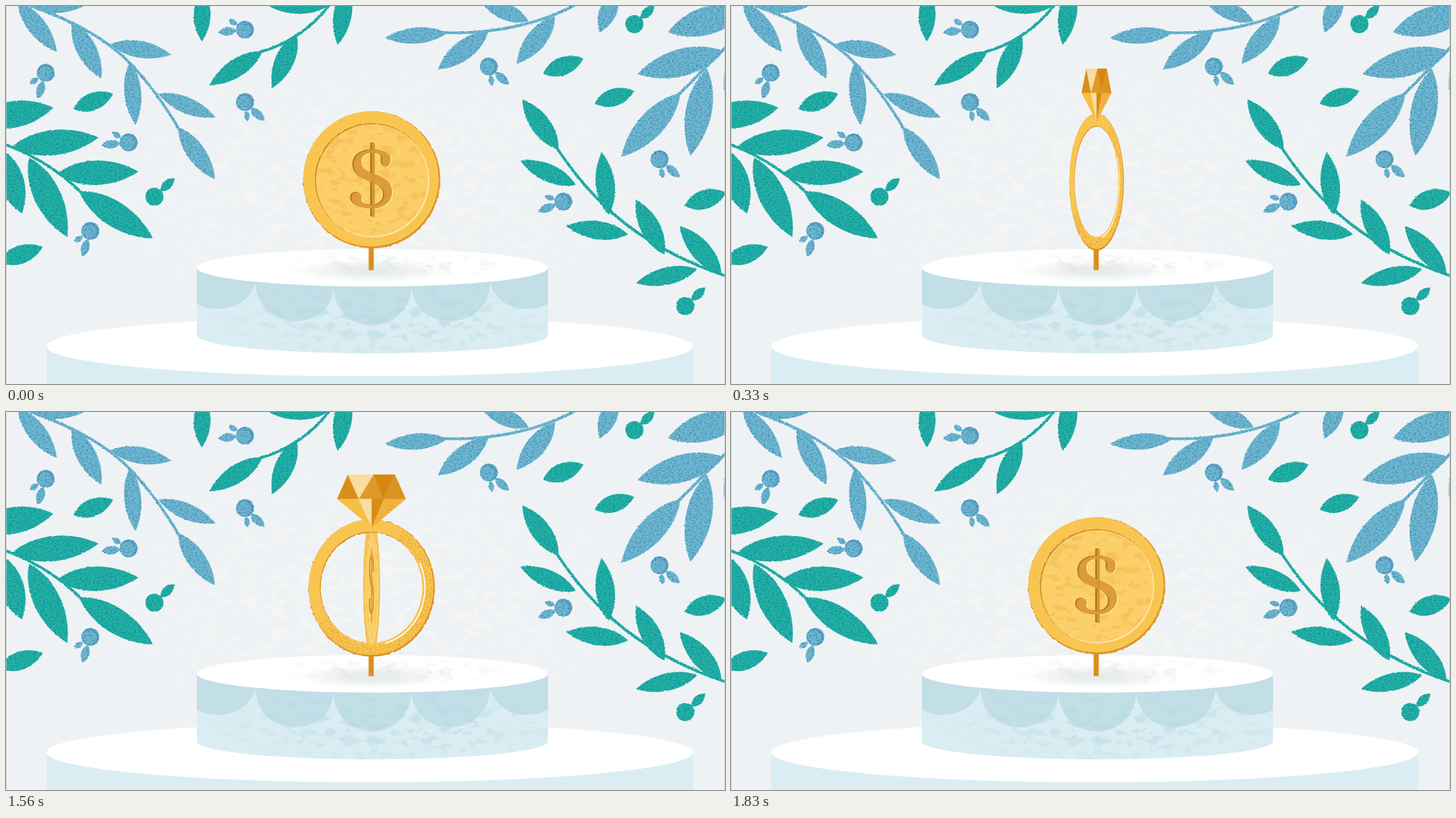
Write an HTML page that moves like this. It is 1032 by 543 pixels and loops after 2.86 s.

```html
<!DOCTYPE html>
<html lang="en">
<head>
<meta charset="utf-8">
<title>Coin and ring</title>
<style>
  html, body { margin: 0; width: 100%; height: 100%; overflow: hidden; background: #eff2f4; }
  svg { display: block; width: 100%; height: 100%; }
</style>
</head>
<body>
<svg viewBox="0 0 1032 543" preserveAspectRatio="none">
  <defs>
    <!-- ragged edge with a linen grain -->
    <filter id="leafy" x="-10%" y="-10%" width="120%" height="120%" color-interpolation-filters="sRGB">
      <feTurbulence type="fractalNoise" baseFrequency=".32 .5" numOctaves="2" seed="4" result="n"/>
      <feDisplacementMap in="SourceGraphic" in2="n" scale="2.6" xChannelSelector="R" yChannelSelector="G" result="s"/>
      <feColorMatrix in="n" values="0 0 0 0 0  0 0 0 0 .36  0 0 0 0 .46  1.1 0 0 0 -.46"/>
      <feComposite in2="s" operator="in" result="g"/>
      <feMerge><feMergeNode in="s"/><feMergeNode in="g"/></feMerge>
    </filter>
    <filter id="rough" x="-10%" y="-10%" width="120%" height="120%" color-interpolation-filters="sRGB">
      <feTurbulence type="fractalNoise" baseFrequency=".2" numOctaves="2" seed="9"/>
      <feDisplacementMap in="SourceGraphic" scale="3" xChannelSelector="R" yChannelSelector="G"
        in2="SourceGraphic" result="unused"/>
      <feTurbulence type="fractalNoise" baseFrequency=".2" numOctaves="2" seed="9" result="n"/>
      <feDisplacementMap in="SourceGraphic" in2="n" scale="3" xChannelSelector="R" yChannelSelector="G"/>
    </filter>
    <!-- keep only speckles of the shape -->
    <filter id="fine" x="-20%" y="-20%" width="140%" height="140%" color-interpolation-filters="sRGB">
      <feTurbulence type="fractalNoise" baseFrequency=".55" numOctaves="2" seed="2"/>
      <feColorMatrix values="0 0 0 0 0  0 0 0 0 0  0 0 0 0 0  6 0 0 0 -3.1" result="m"/>
      <feComposite in="SourceGraphic" in2="m" operator="in"/>
    </filter>
    <filter id="patch" x="-5%" y="-5%" width="110%" height="110%" color-interpolation-filters="sRGB">
      <feTurbulence type="fractalNoise" baseFrequency=".05 .09" numOctaves="5" seed="7"/>
      <feColorMatrix values="0 0 0 0 0  0 0 0 0 0  0 0 0 0 0  9 0 0 0 -4.8" result="m"/>
      <feComposite in="SourceGraphic" in2="m" operator="in"/>
    </filter>
    <radialGradient id="haze">
      <stop offset=".35" stop-color="#f7f6f4"/>
      <stop offset="1" stop-color="#f7f6f4" stop-opacity="0"/>
    </radialGradient>
    <radialGradient id="shade">
      <stop offset=".3" stop-color="#dfe3e5"/>
      <stop offset="1" stop-color="#dfe3e5" stop-opacity="0"/>
    </radialGradient>
    <radialGradient id="frost">
      <stop offset=".3" stop-color="#b3d9e0"/>
      <stop offset="1" stop-color="#b3d9e0" stop-opacity="0"/>
    </radialGradient>
    <path id="ess" d="M551 214C544 208 535 207 526 207C508 207 499 216 499 228C499 241 509 247 522 252
      C536 257 543 262 543 271C543 281 536 286 526 286C517 286 509 283 510 277C512 271 507 267 502 268
      C497 269 495 273 496 278C498 286 510 291 525 291C543 291 554 281 554 267C554 254 546 248 532 243
      C519 238 510 234 510 224C510 215 517 211 526 211C534 211 540 213 540 219C538 226 542 231 546 231
      C552 230 553 220 551 214Z"/>
    <clipPath id="tier"><path d="M274 376V473A252 26 0 0 0 778 473V376Z"/></clipPath>
  </defs>

  <rect width="1032" height="543" fill="#eff2f4"/>
  <ellipse cx="520" cy="270" rx="430" ry="200" fill="url(#haze)" filter="url(#patch)" opacity=".75"/>
  <g id="plants"></g>

  <g id="cake">
    <path d="M58 489V543H986V489Z" fill="#d9edf2"/>
    <ellipse cx="522" cy="489" rx="464" ry="43" fill="#fff"/>
    <path d="M274 376V473A252 26 0 0 0 778 473V376Z" fill="#d9edf2"/>
    <path d="M274 376V428C295 440 345 440 358 398C362 470 466 470 470 404C474 477 578 477 582 403
      C586 470 691 470 695 398C708 440 755 440 778 428V376Z" fill="#c2dee7"/>
    <g clip-path="url(#tier)">
      <ellipse cx="560" cy="450" rx="270" ry="62" fill="url(#frost)" filter="url(#patch)" opacity=".5"/>
    </g>
    <ellipse cx="526" cy="376" rx="252" ry="27" fill="#fff"/>
    <ellipse cx="526" cy="380" rx="108" ry="17" fill="url(#shade)" opacity=".7"/>
    <ellipse cx="560" cy="372" rx="190" ry="21" fill="url(#shade)" filter="url(#patch)" opacity=".5"/>
  </g>

  <rect x="520.5" y="340" width="7.3" height="39.5" fill="#d9901c"/>

  <g id="coin">
    <circle cx="525" cy="249.7" r="98.4" fill="#dc9526" filter="url(#rough)"/>
    <circle cx="523.9" cy="248.3" r="97" fill="#f9c551"/>
    <circle cx="525" cy="249.7" r="81.5" fill="#c88a25" filter="url(#rough)"/>
    <circle cx="526.4" cy="251.1" r="81" fill="#fef0c4"/>
    <circle cx="525.6" cy="250.3" r="80.5" fill="#fbcf69"/>
    <circle cx="525.6" cy="250.3" r="79.5" fill="#f0b94b" filter="url(#patch)" opacity=".5"/>
    <g fill="#fce3a3" transform="translate(1.6 1)"><use href="#ess"/></g>
    <g fill="#a8741f">
      <use href="#ess" x="-1.8" y="-.8"/>
      <rect x="522.8" y="196" width="5" height="106"/>
    </g>
    <use href="#ess" fill="#dc9c37"/>
    <rect x="525" y="197" width="4.3" height="106" fill="#d7952c"/>
  </g>

  <g id="ring" fill="none">
    <g filter="url(#rough)">
      <circle cx="525" cy="252.8" r="89" stroke="#d9911f" stroke-width="19"/>
    </g>
    <circle cx="524" cy="251.8" r="88.6" stroke="#f9c551" stroke-width="17.4"/>
    <path d="M569.5 175.7A89 89 0 1 1 448 297.3" stroke="#dc9526" stroke-width="15" filter="url(#fine)" opacity=".75"/>
    <path d="M600 217A82 82 0 0 1 546 332" stroke="#fff" stroke-width="1.9"/>
    <g id="gem"></g>
  </g>

  <path d="M.5 0V543M1031.5 0V543" stroke="#c9cdcf" stroke-width="1" opacity=".7"/>
</svg>

<script>
const TEAL = '#23b3a8', BLUE = '#72b9d5', DEEP = '#5fa5c8';
const $ = id => document.getElementById(id);

// Pointed leaf from base (x, y) to tip (u, v), w wide.
function leaf([x, y, u, v, w], fill) {
  const dx = u - x, dy = v - y, k = w * .67 / Math.hypot(dx, dy);
  const at = (f, side) => `${(x + dx * f - dy * k * side).toFixed(1)} ${(y + dy * f + dx * k * side).toFixed(1)}`;
  return `<path fill="${fill}" d="M${x} ${y}C${at(.27, 1)} ${at(.68, 1)} ${u} ${v}C${at(.68, -1)} ${at(.27, -1)} ${x} ${y}Z"/>`;
}

function branch(fill, stem, leaves) {
  const line = stem ? `<path d="${stem}" fill="none" stroke="${fill}" stroke-width="4" stroke-linecap="round"/>` : '';
  return `<g filter="url(#leafy)">${line}${leaves.map(l => leaf(l, fill)).join('')}</g>`;
}

function spoke(x, y, deg, from, to, w, fill) {
  const c = Math.cos(deg * Math.PI / 180), s = Math.sin(deg * Math.PI / 180);
  return leaf([x + c * from, y + s * from, x + c * to, y + s * to, w], fill);
}

const blueBerry = ([x, y, a]) => `<g filter="url(#leafy)">
  <circle cx="${x}" cy="${y}" r="12.8" fill="${DEEP}"/>
  <circle cx="${x - 1.5}" cy="${y + 1}" r="10.2" fill="${BLUE}"/>
  ${spoke(x, y, a, 12, 39, 12, BLUE)}${spoke(x, y, a + 38, 13, 28, 8, BLUE)}</g>`;

const tealBerry = ([x, y]) => `<g filter="url(#leafy)">
  <circle cx="${x}" cy="${y}" r="13" fill="${TEAL}"/>${spoke(x, y, -43, 12, 39, 13, TEAL)}</g>`;

$('plants').innerHTML = [
  branch(BLUE, 'M36 0C100 22 150 52 180 84S230 145 250 180', [
    [17, -6, 73, 66, 26], [35, 1, 122, -6, 24], [95, 23, 137, 104, 28], [150, 55, 237, 70, 24],
    [178, 80, 186, 171, 24], [219, 126, 301, 160, 23], [247, 174, 300, 249, 26]]),
  branch(TEAL, 'M-4 198C40 214 80 240 110 270', [
    [-45, 165, 68, 146, 38], [8, 203, 133, 189, 36], [73, 241, 190, 238, 35], [105, 266, 211, 334, 36],
    [33, 218, 88, 332, 38], [-8, 205, 23, 298, 36]]),
  branch(TEAL, '', [[-10, 368, 53, 346, 26]]),
  branch(TEAL, '', [[97, 148, 154, 126, 25]]),
  branch(TEAL, 'M463 0C440 30 405 55 365 66', [
    [368, 65, 292, 114, 26], [417, 40, 382, 118, 27], [462, 0, 370, -4, 26],
    [490, -30, 476, 56, 26], [282, -22, 281, 51, 24]]),
  branch(BLUE, 'M818 -2C770 24 700 42 625 38', [
    [633, 39, 544, 46, 23], [692, 37, 620, 91, 28], [788, 15, 733, 83, 28],
    [750, 22, 680, -8, 24], [876, -22, 852, 38, 25]]),
  branch(TEAL, '', [[771, 97, 829, 75, 26]]),
  branch(TEAL, '', [[845, 140, 902, 122, 25]]),
  branch(TEAL, '', [[974, 287, 1034, 268, 27]]),
  branch(BLUE, 'M1034 58L965 128', [
    [1060, 5, 950, 38, 40], [1030, 65, 906, 98, 39], [968, 125, 883, 217, 36],
    [1006, 90, 982, 215, 37], [1045, 60, 1038, 150, 22]]),
  branch(TEAL, 'M790 203C830 262 890 340 1034 388', [
    [793, 206, 741, 134, 28], [818, 257, 738, 222, 25], [865, 300, 855, 210, 27], [945, 357, 904, 278, 28],
    [893, 328, 804, 316, 26], [1027, 385, 967, 316, 28], [992, 378, 904, 398, 25]]),
  ...[[57, 96, 107], [343, 34, 174], [343, 138, 44], [176, 196, 174], [121, 323, 107],
    [693, 87, 42], [938, 220, 42], [800, 281, 158]].map(blueBerry),
  ...[[213, 274], [902, 26], [975, 431]].map(tealBerry)
].join('');

$('gem').innerHTML = [
  ['488,90 471,125 505,125', '#d98e17'],
  ['488,90 528,90 505,125', '#f8dda0'],
  ['528,90 505,125 543,125', '#de9a27'],
  ['528,90 561,90 543,125', '#d6870f'],
  ['561,90 578,125 543,125', '#dc931f'],
  ['471,125 505,125 525,166', '#f6bf4a'],
  ['505,125 525,125 525,166', '#f9dfa6'],
  ['525,125 544,125 525,166', '#d88c15'],
  ['544,125 578,125 525,166', '#f3b841']
].map(([p, c]) => `<polygon points="${p}" fill="${c}" stroke="${c}" stroke-width=".5"/>`).join('') +
  '<polygon points="544,125 578,125 525,166" fill="#dc9526" filter="url(#fine)" opacity=".7"/>';

const LOOP = 2860, STEP = 30, AXIS = 524.7;
const clamp = x => Math.min(1, Math.max(0, x));
const smooth = x => (x = clamp(x), x * x * (3 - 2 * x));

// Widths of coin and ring; both turn in hard 30 ms steps.
function widths(t) {
  if (t < 1560) {
    const k = Math.min(16, Math.floor(t / STEP));
    return [1 - smooth(k / 7.5), smooth((k - 7.2) / 8.8)];
  }
  const j = Math.min(10, Math.floor((t - 1530) / STEP));
  return [j === 10 ? 1 : Math.sin((9 * j - 2) * Math.PI / 180), clamp(1 - (j / 6.6) ** 1.34)];
}

function turn(el, s) {
  el.style.display = s < .005 ? 'none' : '';
  el.setAttribute('transform', `translate(${AXIS} 0) scale(${s.toFixed(4)} 1) translate(${-AXIS} 0)`);
}

const coin = $('coin'), ring = $('ring'), start = performance.now();
let last = '';
function draw() {
  const w = widths((performance.now() - start) % LOOP);
  if (w.join() !== last) {
    last = w.join();
    turn(coin, w[0]);
    turn(ring, w[1]);
  }
  requestAnimationFrame(draw);
}
draw();
</script>
</body>
</html>
```
